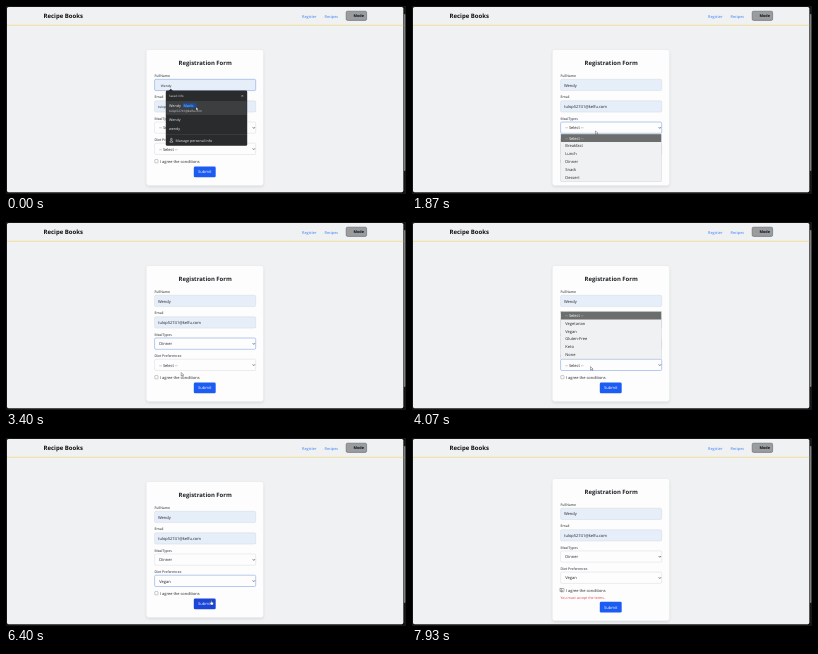
These frames come from a looping animation (400 px wide and 188 px high, 8 s). An HTML page:

```html
<!DOCTYPE html>
<html lang="en">
<head>
<meta charset="utf-8">
<title>Registration form</title>
<style>
html, body { margin: 0; width: 100%; height: 100%; overflow: hidden; background: #000; }
svg { display: block; width: 100%; height: 100%; }
text { font-family: "Open Sans", "Noto Sans", sans-serif; text-rendering: geometricPrecision; white-space: pre; }
</style>
</head>
<body>
<svg id="stage" viewBox="0 0 400 188"></svg>
<script>
const LOOP = 8000;
const INK = '#1f2226', FOCUS = '#86a6e4', LINE = '#cdd1d6', FILL = '#e6eef9';
const NAME = 'Wendy', MAIL = 'tulop52741@kelfu.com';
const stage = document.getElementById('stage');

function add(parent, tag, attrs = {}, content) {
  const el = document.createElementNS('http://www.w3.org/2000/svg', tag);
  for (const k in attrs) el.setAttribute(k, attrs[k]);
  if (content !== undefined) el.textContent = content;
  return parent.appendChild(el);
}
const group = (parent = stage) => add(parent, 'g');
const box = (g, x, y, width, height, fill, more = {}) =>
  add(g, 'rect', { x, y, width, height, fill, ...more });
const label = (g, x, y, str, size = 4, fill = INK, weight = 500, more = {}) =>
  add(g, 'text', { x, y, 'font-size': size, fill, 'font-weight': weight, ...more }, str);
const path = (g, d, stroke, width = 0.5) =>
  add(g, 'path', { d, fill: 'none', stroke, 'stroke-width': width });
const show = (el, on) => el.setAttribute('visibility', on ? 'visible' : 'hidden');
const shift = (el, x, y) => el.setAttribute('transform', `translate(${x} ${y})`);

function field(g, y, fill) {
  return box(g, 148.6, y, 101.1, 11.3, fill, { rx: 1.3, stroke: LINE, 'stroke-width': 0.4 });
}
function setFocus(el, on) {
  el.setAttribute('stroke', on ? FOCUS : LINE);
  el.setAttribute('stroke-width', on ? 0.6 : 0.4);
}
function select(g, y) {
  const frame = field(g, y, '#fdfdfd');
  path(g, `M246.7 ${y + 5.2}l1.1 1.2 1.1 -1.2`, '#222', 0.6);
  return { frame, text: label(g, 153.3, y + 7.4, '-- Select --') };
}

const ROW = 7.8;
function dropdown(top, names) {
  const g = group();
  box(g, 148.8, top, 100.6, ROW * 6 + 0.8, '#f0f1f2', { stroke: '#c4c7ca', 'stroke-width': 0.4 });
  const rows = ['-- Select --', ...names].map((name, i) => ({
    bar: box(g, 149, top + 0.3 + i * ROW, 100.2, ROW, 'none'),
    text: label(g, 153.3, top + 5.6 + i * ROW, name)
  }));
  return { g, rows, top };
}
function hover(list, index) {
  list.rows.forEach((row, i) => {
    row.bar.setAttribute('fill', i === index ? '#6c6d6d' : i ? 'none' : '#e0e2e3');
    row.text.setAttribute('fill', i === index ? '#fff' : INK);
  });
}
const rowAt = (list, y) => Math.max(0, Math.min(5, Math.floor((y - list.top) / ROW)));

// Page and header
const page = group();
box(page, 0, 0, 400, 188, '#161616');
box(page, 1, 1, 396.3, 185.2, '#eff1f2', { rx: 1.6 });
box(page, 397.8, 8, 1.6, 157, '#7d7f80', { rx: 0.8 });
box(page, 1, 18.8, 396.3, 0.8, '#f2d98b');
label(page, 37.5, 12.2, 'Recipe Books', 6, '#111', 700);
label(page, 296, 11.5, 'Register', 3.85, '#3c7ff4');
label(page, 318.5, 11.5, 'Recipes', 3.85, '#3c7ff4');
box(page, 340.2, 5.2, 20.4, 9.2, '#999da1', { rx: 1.3, stroke: '#5f656b', 'stroke-width': 0.6 });
add(page, 'circle', { cx: 344.8, cy: 9.9, r: 1.1, fill: '#a89a6a' });
label(page, 347.4, 11.4, 'Mode', 3.8, '#0d0f12', 700);

// Card
const defs = add(stage, 'defs');
const soft = add(defs, 'filter', { id: 'soft', x: '-10%', y: '-10%', width: '120%', height: '125%' });
add(soft, 'feDropShadow', { dx: 0, dy: 1.2, stdDeviation: 1.5, 'flood-color': '#000', 'flood-opacity': 0.13 });
const card = box(stage, 140.7, 44, 116.4, 135.2, '#fdfdfd', { rx: 2, filter: 'url(#soft)' });

const form = group();
label(form, 199.2, 59.1, 'Registration Form', 5.95, INK, 650, { 'text-anchor': 'middle' });
[['FullName', 71.1], ['Email', 92.3], ['MealTypes', 113.7], ['Diet Preferences', 134.9]]
  .forEach(([str, y]) => label(form, 148.5, y, str, 3.5));
const nameBox = field(form, 73.3, FILL);
const nameText = label(form, 152, 80.6, NAME);
field(form, 94.8, FILL);
const mailText = label(form, 152, 101.9, MAIL);
const meal = select(form, 116);
const diet = select(form, 137.2);
const check = box(form, 148.8, 153.6, 3.2, 3.2, '#fff', { rx: 0.5, stroke: '#777', 'stroke-width': 0.4 });
label(form, 154, 157.1, 'I agree the conditions', 3.95);
const error = label(stage, 148.5, 160.5, 'You must accept the terms.', 3.5, '#e0393e');

const submit = group();
const button = box(submit, 187.8, 160.6, 21.9, 10.7, '#1c5cf3', { rx: 1.3 });
label(submit, 198.7, 167.4, 'Submit', 4, '#fff', 500, { 'text-anchor': 'middle' });

const meals = dropdown(127.9, ['Breakfast', 'Lunch', 'Dinner', 'Snack', 'Dessert']);
const diets = dropdown(89.4, ['Vegetarian', 'Vegan', 'Gluten-Free', 'Keto', 'None']);

// Autofill popup
const popup = group();
add(popup, 'path', { d: 'M162.6 85l2.2 -2.2 2.2 2.2z', fill: '#2a2b2c' });
box(popup, 159.8, 84.6, 81.4, 55.2, '#2a2b2c', { rx: 1.4 });
label(popup, 163, 91, 'Saved info', 3, '#e4e4e4');
path(popup, 'M235.4 89l1.8 1.8m0 -1.8l-1.8 1.8', '#ddd', 0.4);
box(popup, 160.2, 95, 80.6, 14, '#3d3e40');
label(popup, 163, 100.8, NAME, 3.7, '#f2f2f2');
box(popup, 177, 97.2, 13.4, 4.6, '#1b4f9c');
label(popup, 177.5, 100.8, 'Marlo', 3.7, '#8fc0ff');
label(popup, 163, 106.3, MAIL, 3.05, '#d4d4d4');
label(popup, 163, 115.4, NAME, 3.6, '#eee');
label(popup, 163, 124.4, 'wendy', 3.6, '#eee');
box(popup, 160, 128.6, 81, 0.35, '#56585a');
add(popup, 'circle', { cx: 165.4, cy: 133.2, r: 0.9, fill: 'none', stroke: '#ddd', 'stroke-width': 0.5 });
path(popup, 'M163.9 136.2q0 -1.6 1.5 -1.6t1.5 1.6z', '#ddd');
label(popup, 169.6, 135.6, 'Manage personal info', 3.6, '#eee');

// Pointer: an arrow, or a hand above the button
const ARROW = 'M0 0V3.5L0.9 2.7 1.5 4 2.1 3.7 1.5 2.5 2.6 2.4z';
const HAND = 'M0 0.3q0.5 -0.6 0.9 0V1.7L2.6 2.1V3.7L2 4.6H0.1L-1 2.6 -0.5 2.2 0 2.6z';
const cursor = add(stage, 'path', {
  fill: '#fff', stroke: '#222', 'stroke-width': 0.35, 'stroke-linejoin': 'round'
});

// Pointer stops: time, x, y
const STOPS = [
  [0, 190, 101], [450, 190, 101], [1070, 184, 123.3], [1750, 184, 123.3],
  [2500, 177, 147], [2870, 176, 149.4], [3080, 173, 154.5], [3250, 173, 154.5],
  [3600, 178.5, 144.6], [4400, 178.5, 144.6], [5070, 182, 111.3], [5600, 182, 111.3],
  [6100, 196, 148], [6350, 204.8, 162.4], [7730, 204.8, 162.4], [7930, 148, 150], [8000, 148, 150]
];
function pointer(t) {
  const i = Math.max(1, STOPS.findIndex(s => s[0] >= t));
  const [t0, x0, y0] = STOPS[i - 1], [t1, x1, y1] = STOPS[i];
  const p = (t - t0) / (t1 - t0), e = p * p * (3 - 2 * p);
  return [x0 + (x1 - x0) * e, y0 + (y1 - y0) * e];
}

function draw(t) {
  const within = (a, b) => t >= a && t < b;
  const [x, y] = pointer(t);
  const onButton = within(6290, 7760);
  shift(cursor, x, y);
  cursor.setAttribute('d', onButton ? HAND : ARROW);

  const preview = t < 470;
  show(popup, preview);
  nameText.setAttribute('x', preview ? 154.8 : 152);
  [nameText, mailText].forEach(el => el.setAttribute('font-size', preview ? 3.3 : 4));
  setFocus(nameBox, t < 1400);
  setFocus(meal.frame, within(1400, 3670));
  setFocus(diet.frame, within(3670, 6600));

  show(meals.g, within(1470, 3200));
  hover(meals, rowAt(meals, y));
  show(diets.g, within(3730, 5400));
  hover(diets, y > 137 ? (t < 4500 ? 0 : 5) : rowAt(diets, y));
  meal.text.textContent = t < 3200 ? '-- Select --' : 'Dinner';
  diet.text.textContent = t < 5400 ? '-- Select --' : 'Vegan';

  const failed = t >= 7000;
  shift(form, 0, failed ? -3.1 : 0);
  shift(submit, 0, failed ? 3.2 : 0);
  card.setAttribute('y', failed ? 40.9 : 44);
  card.setAttribute('height', failed ? 141.5 : 135.2);
  show(error, failed);
  button.setAttribute('fill', onButton ? '#1a45d8' : '#1c5cf3');
  check.setAttribute('stroke', t > 7900 ? '#444' : '#777');
}

const start = performance.now();
function tick() {
  draw((performance.now() - start) % LOOP);
  requestAnimationFrame(tick);
}
draw(0);
requestAnimationFrame(tick);
</script>
</body>
</html>
```
